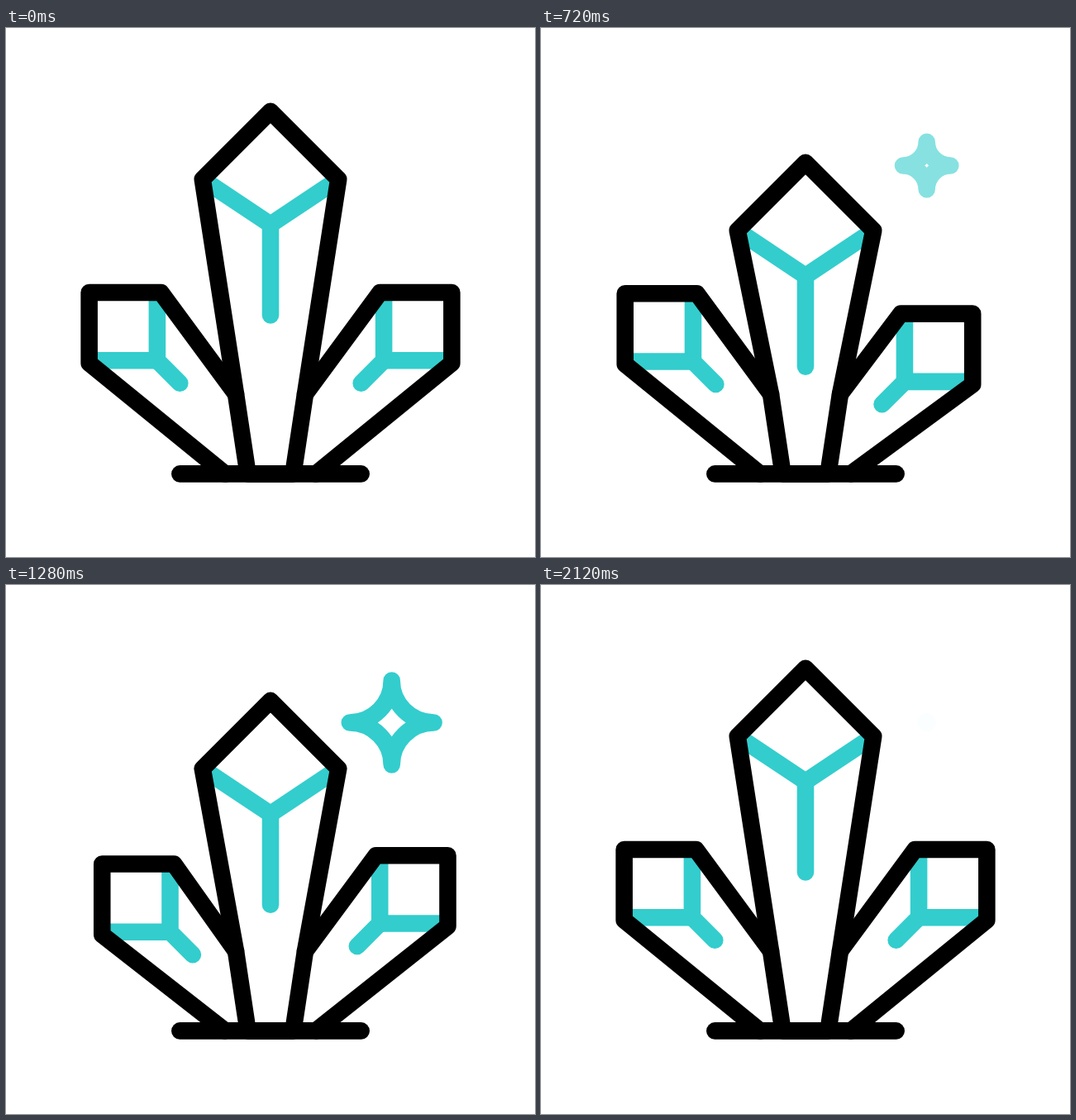
Write an HTML page with a canvas that moves like this. It is 640 by 640 pixels and loops after 2400 ms.

```html
<!DOCTYPE html>
<html lang="en">
<head>
<meta charset="utf-8">
<title>Crystals</title>
<style>
html, body { margin: 0; width: 100%; height: 100%; overflow: hidden; background: #fff; }
canvas { display: block; width: 640px; height: 640px; }
</style>
</head>
<body>
<canvas id="stage" width="640" height="640"></canvas>
<script>
const ctx = document.getElementById('stage').getContext('2d');
const LOOP = 2400, END = 2120, STEP = 20;
const TEAL = '#33cdcd', BLACK = '#000';
const UNIT = 1.371, GROUND = 539.4;

// Smooth 0 to 1 between two times.
function ease(t, from, to) {
  const u = Math.min(1, Math.max(0, (t - from) / (to - from)));
  return u * u * (3 - 2 * u);
}

// Down and back up again between two times.
function dip(t, from, to) {
  const mid = (from + to) / 2;
  return ease(t, from, mid) - ease(t, mid, to);
}

function line(color, points, closed) {
  ctx.strokeStyle = color;
  ctx.beginPath();
  points.forEach(([x, y]) => ctx.lineTo(x, y));
  if (closed) ctx.closePath();
  ctx.stroke();
}

// Drawn for the right side; side -1 mirrors it to the left.
function sideCrystal(side, inward, down) {
  const move = points => points.map(([x, y]) => [x - inward, y - down]);
  ctx.save();
  ctx.scale(side, 1);
  line(TEAL, move([[100, 157], [100, 100], [80, 80]]));
  line(TEAL, move([[100, 100], [156, 100]]));
  line(BLACK, [
    [40, 0],
    ...move([[160, 97.6], [160, 160], [96.6, 160]]),
    [30.6, 70.3]
  ]);
  ctx.restore();
}

function middleCrystal(down) {
  const shoulder = 260 - down, fork = 220 - down;
  line(TEAL, [[-56, fork + 37.3], [0, fork], [56, fork + 37.3]]);
  line(TEAL, [[0, fork], [0, fork - 80]]);
  line(BLACK, [
    [-20, 0], [-30.6, 70.3], [-60, shoulder], [0, shoulder + 60],
    [60, shoulder], [30.6, 70.3], [20, 0]
  ], true);
}

// Four quarter arcs, each bulging towards the centre.
function star(r, alpha) {
  if (r <= 0) return;
  ctx.save();
  ctx.globalAlpha = alpha;
  ctx.strokeStyle = TEAL;
  ctx.translate(107, 272);
  ctx.beginPath();
  for (let i = 0; i < 4; i++) {
    ctx.arc(r, -r, r, Math.PI, Math.PI / 2, true);
    ctx.rotate(Math.PI / 2);
  }
  ctx.closePath();
  ctx.stroke();
  ctx.restore();
}

function draw(t) {
  ctx.fillStyle = '#fff';
  ctx.fillRect(0, 0, 640, 640);
  ctx.save();
  ctx.translate(320, GROUND);
  ctx.scale(UNIT, -UNIT);
  ctx.lineWidth = 15;
  ctx.lineCap = ctx.lineJoin = 'round';

  const fade = 1 - ease(t, 1720, 2160);
  const growth = 1 - Math.exp(-Math.max(0, t - 530) / 247);
  star(39 * growth * fade, ease(t, 530, 870) * fade);

  const left = dip(t, 38, 766) + dip(t, 766, 1496);
  const right = dip(t, 400, 1160) + dip(t, 1160, 1870);
  sideCrystal(-1, 17.9 * left, 20.1 * left);
  sideCrystal(1, 13.4 * right, 20 * right);
  middleCrystal(51.8 * dip(t, 228, 1034) + 38 * dip(t, 1034, 1762));
  line(BLACK, [[-80, 0], [80, 0]]);
  ctx.restore();
}

const start = performance.now();
function frame() {
  const t = (performance.now() - start) % LOOP;
  draw(Math.min(Math.floor(t / STEP) * STEP, END));
  requestAnimationFrame(frame);
}
frame();
</script>
</body>
</html>
```
